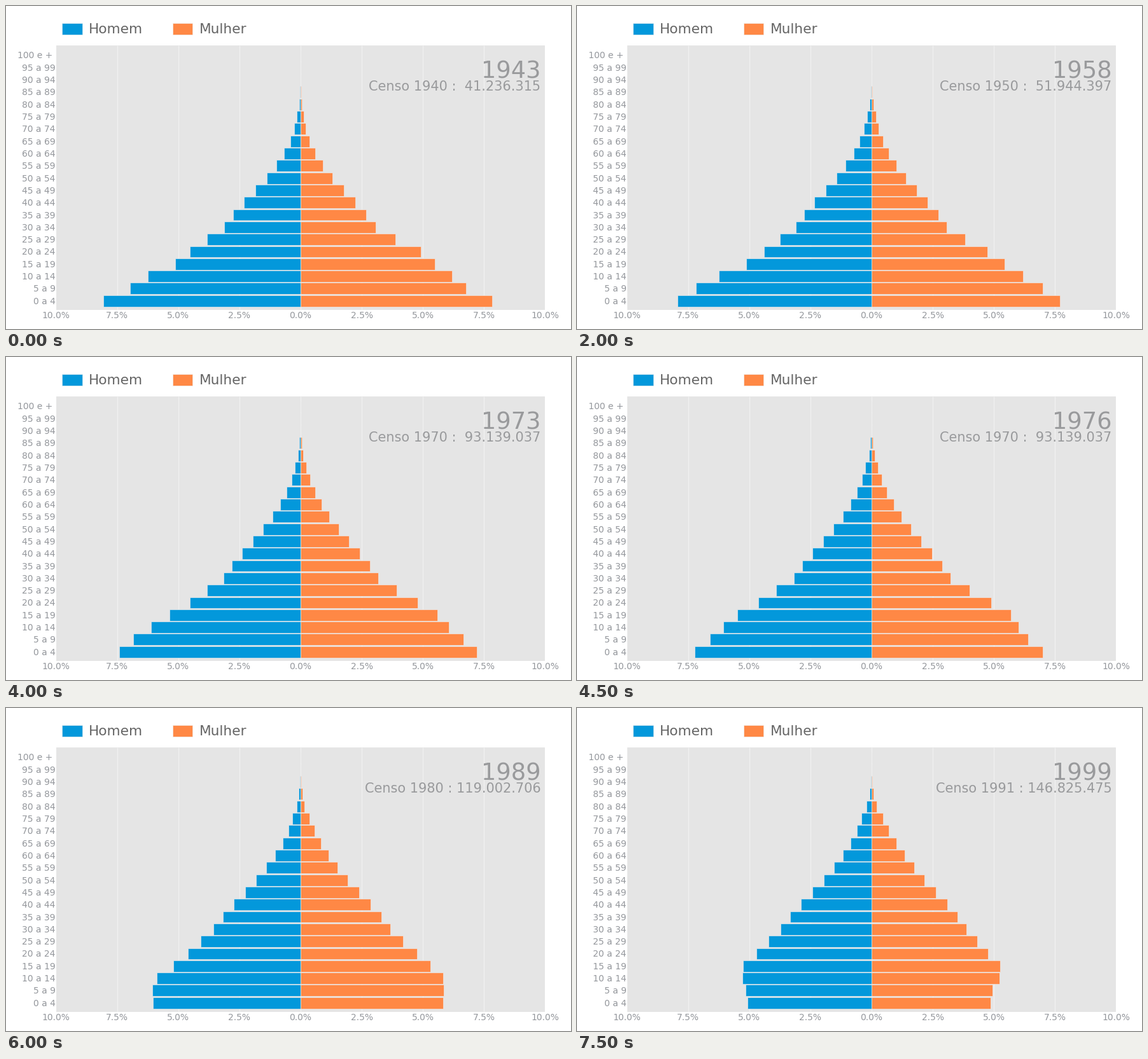
Recreate the animation shown at these times as a matplotlib script. Size 888 px wide and 508 px high, loop 8000 ms.

```python
import matplotlib.pyplot as plt
import numpy as np
from matplotlib.animation import FuncAnimation
from matplotlib.patches import Rectangle

W, H, DPI = 888, 508, 100
FRAMES, INTERVAL = 16, 500
BLUE, ORANGE = "#0398db", "#ff8845"
PANEL, EDGE, GRID = "#e5e5e5", "#eeeeee", "#f1f1f1"
LABEL, TITLE, LEGEND = "#94979c", "#999a9c", "#666666"

LEFT, RIGHT, TOP, BOTTOM = 79, 847, 62, 478
MID, QUARTER = 463, 96.1          # 0 % line, width of 2.5 %
ROWS, ROW0, PITCH, BAR = 21, 463.7, 19.31, 17.9
ROW = np.arange(ROWS)

# The year shown at a few steps of the loop
YEARS = {0: 1943, 2: 1951, 6: 1965, 8: 1973, 10: 1980, 12: 1989, 15: 1999}

CENSUS = {
    1940: " 41.236.315",
    1950: " 51.944.397",
    1960: " 70.191.370",
    1970: " 93.139.037",
    1980: "119.002.706",
    1991: "146.825.475",
}

# Men's bars in pixels below age 35: key rows, key steps
YOUNG_ROWS = [0, 1, 2, 3, 4, 6]
YOUNG = {
    1: (310, 268, 240, 197, 174, 120),
    6: (301, 282, 240, 197, 165, 119),
    10: (270, 245, 231, 216, 183, 123),
    12: (232, 233, 226, 200, 177, 137),
    15: (195, 198, 203, 202, 181, 143),
}

plt.rcParams["font.family"] = "DejaVu Sans"
fig = plt.figure(figsize=(W / DPI, H / DPI), dpi=DPI, facecolor="white")
ax = fig.add_axes([0, 0, 1, 1])
ax.set_xlim(0, W)
ax.set_ylim(H, 0)
ax.axis("off")


def px(n):
    """Pixels to points."""
    return n * 72 / DPI


def box(x, y, w, h, color, edge="none", z=1):
    return ax.add_patch(Rectangle((x, y), w, h, facecolor=color, edgecolor=edge,
                                  linewidth=px(0.6), zorder=z))


def label(x, y, text, size, color, ha="left"):
    return ax.text(x, y, text, fontsize=size, color=color, ha=ha,
                   va="baseline", zorder=5)


def row_y(i):
    return ROW0 - i * PITCH


def plateau(center, width):
    """Soft-edged block of rows."""
    return np.exp(-((ROW - center) / width) ** 4)


def men_bars(step):
    """Key points for the young, then a bell-shaped decline that thins out."""
    keys = [np.interp(step, list(YOUNG), col) for col in zip(*YOUNG.values())]
    age = np.maximum(ROW - YOUNG_ROWS[-1], 0)
    decay = 0.095 * age + (0.027 - 0.0007 * step) * age ** 2
    taper = np.clip((19 - ROW) / 4, 0, 1)
    return np.interp(ROW, YOUNG_ROWS, keys) * np.exp(-decay) * taper


def women_bars(step, men):
    """Fewer girls, a fading surplus at 15 to 29, a growing one later in life."""
    s = (step / (FRAMES - 1)) ** 1.5
    gap = (-8.5 * plateau(0, 1.9)
           + 16 * (1 - s) * plateau(3.7, 1.2)
           + (11 * s - 3) * plateau(9.5, 5))
    return np.maximum(men + gap, 0) * (men > 0)


# Static parts
box(LEFT, TOP, RIGHT - LEFT, BOTTOM - TOP, PANEL)
for k in range(-4, 5):
    x = MID + k * QUARTER
    if abs(k) < 4:
        ax.plot([x, x], [TOP, BOTTOM], color=GRID, lw=px(1.3),
                solid_capstyle="butt", zorder=2)
    label(x, 491, f"{abs(k) * 2.5:.1f}%", 10, LABEL, "center")
for i in ROW:
    name = f"{5 * i} a {5 * i + 4}" if i < ROWS - 1 else "100 e + "
    label(77.7, row_y(i) + 5, name, 10, LABEL, "right")
for x, color, name in [(88, BLUE, "Homem"), (261.5, ORANGE, "Mulher")]:
    box(x, 26.5, 31.5, 18, color, EDGE)
    label(x + 42, 43, name, 15.6, LEGEND)

# Moving parts
men, women = [[box(MID, row_y(i) - BAR / 2, 0, BAR, color, EDGE, 3) for i in ROW]
              for color in (BLUE, ORANGE)]
year_text = label(840.5, 113.5, "", 26.5, TITLE, "right")
census_text = label(840.5, 133, "", 15, TITLE, "right")


def update(step):
    m = men_bars(step)
    w = women_bars(step, m)
    for left, right, a, b in zip(men, women, m, w):
        left.set_x(MID - a)
        left.set_width(a)
        right.set_width(b)

    year = int(round(np.interp(step, list(YEARS), list(YEARS.values()))))
    taken = max(c for c in CENSUS if c <= year)
    year_text.set_text(str(year))
    census_text.set_text(f"Censo {taken} : {CENSUS[taken]}")
    return [*men, *women, year_text, census_text]


anim = FuncAnimation(fig, update, frames=FRAMES, interval=INTERVAL,
                     repeat=True, repeat_delay=0, blit=False)
plt.show()
```
